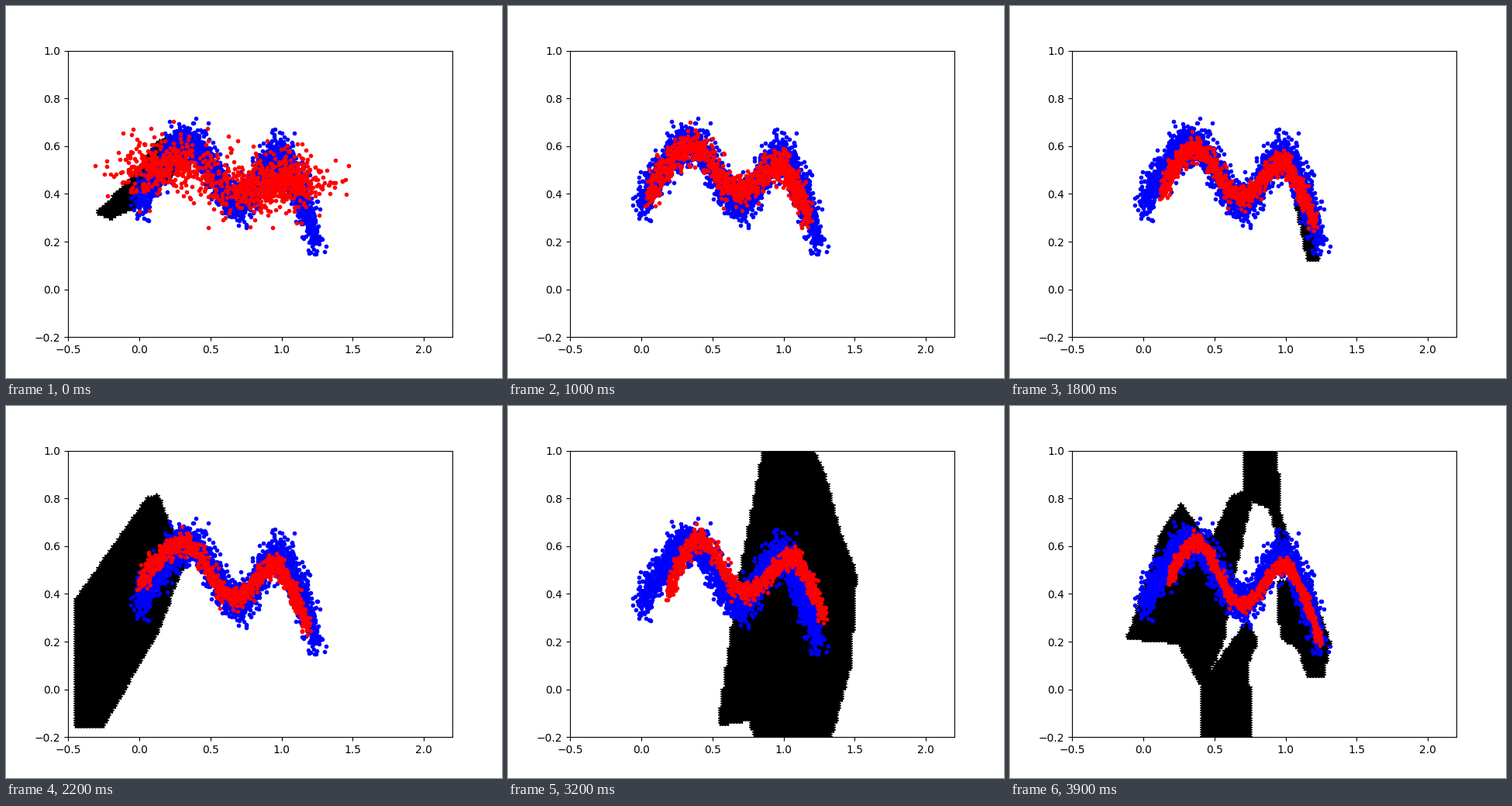
These frames come from a looping animation (640x480 px, 4 s). A matplotlib script:

```python
import numpy as np
import matplotlib.pyplot as plt
from matplotlib.animation import FuncAnimation
from matplotlib.path import Path

FRAMES, INTERVAL = 40, 100
EMPTY = -.2     # field value where the discriminator marks nothing
rng = np.random.default_rng(7)

# Both clouds are noise around an M: foot, peak, valley, peak, foot
REAL_M = [(-.01, .35), (.34, .615), (.7, .365), (.98, .56), (1.24, .2)]

# frame: (noise in x, noise in y, M of the generated samples)
FAKE = {
    0: (.1, .048, [(-.03, .49), (.25, .53), (.8, .42), (1, .45), (1.18, .45)]),
    6: (.02, .034, [(0, .37), (.36, .61), (.68, .46), (1.02, .53), (1.22, .33)]),
    14: (.011, .022, [(.09, .42), (.34, .59), (.68, .38), (.95, .5), (1.12, .27)]),
    18: (.012, .02, [(.13, .41), (.35, .59), (.69, .39), (.98, .53), (1.2, .27)]),
    25: (.012, .018, [(-.1, .475), (.27, .63), (.65, .38), (.94, .51), (1.17, .24)]),
    32: (.012, .018, [(.19, .4), (.39, .63), (.73, .41), (1.07, .55), (1.28, .3)]),
    39: (.007, .013, [(.18, .46), (.36, .62), (.69, .36), (1, .52), (1.24, .2)]),
}

# frame: outlines of the region the discriminator marks
REGIONS = {
    0: [[(-.28, .325), (-.2, .305), (0, .36), (.25, .5), (.25, .645), (.12, .61),
         (-.04, .47)]],
    6: [[(.93, 0), (.98, 0), (1.08, .13), (1.2, .19), (1.27, .45), (1, .65),
         (1.02, .2)]],
    14: [],
    18: [[(1.16, .13), (1.22, .13), (1.15, .4), (1.06, .4)]],
    25: [[(-.6, .43), (0, .94), (.2, .96), (.45, .58), (.47, .46), (.39, .4),
          (.25, .17), (-.2, -.3), (-.6, -.3)]],
    32: [[(.55, -.14), (.76, -.12), (.84, -.25), (1.3, -.25), (1.46, .1),
          (1.5, .48), (1.38, .67), (1.28, .9), (1.16, 1.05), (.88, 1.05),
          (.69, .45)]],
    39: [[(-.1, .22), (.25, .2), (.41, .02), (.55, .2), (.6, .4), (.75, .8),
          (.94, .75), (.93, 1.05), (.72, 1.05), (.72, .83), (.62, .8),
          (.5, .64), (.42, .64), (.26, .77), (.13, .65)],
         [(.42, -.3), (.42, .02), (.73, .28), (.79, .2), (.73, .12), (.75, -.3)],
         [(.95, .45), (.97, .22), (1.09, .18), (1.16, .06), (1.26, .06),
          (1.3, .2), (1.15, .45)],
         [(.9, .75), (.95, .74), (1.02, .6), (.96, .6)]],
}


def m_curve(points, u):
    """Curve through five points: bent outer legs, cosine dip between the peaks."""
    p = np.array(points, float)
    leg = np.minimum((u * 4).astype(int), 3)
    t = u * 4 - leg
    ease = np.choose(leg, [1 - (1 - t) ** 1.5, (1 - np.cos(np.pi * t)) / 2,
                           (1 - np.cos(np.pi * t)) / 2, t ** 1.5])
    return p[leg] + (p[leg + 1] - p[leg]) * np.column_stack([t, ease])


def noise(n):
    return np.clip(rng.standard_t(8, size=(n, 2)), -3.6, 3.6)


def inner_distance(points, poly):
    """Distance to the polygon's outline, positive inside."""
    p = np.array(poly)
    best = np.full(len(points), np.inf)
    for a, b in zip(p, np.roll(p, -1, axis=0)):
        ab = b - a
        t = np.clip((points - a) @ ab / (ab @ ab), 0, 1)
        gap = points - a - t[:, None] * ab
        best = np.minimum(best, np.hypot(*gap.T))
    return np.where(Path(p).contains_points(points), best, -best)


def blend(keys, frame):
    """Linear mix of the values at the two neighbouring key times."""
    times = sorted(keys)
    hi = next(t for t in times if t >= frame)
    lo = max([t for t in times if t < frame], default=hi)
    w = (frame - lo) / (hi - lo) if hi > lo else 1
    return (1 - w) * keys[lo] + w * keys[hi]


gx, gy = np.meshgrid(np.arange(-.5, 2.205, .02), np.arange(-.2, 1.005, .01))
grid = np.column_stack([gx.ravel(), gy.ravel()])
fields = {t: np.max([np.full(len(grid), EMPTY)]
                    + [inner_distance(grid, p) for p in polys], axis=0)
          for t, polys in REGIONS.items()}

real = m_curve(REAL_M, rng.random(2600)) + noise(2600) * (.024, .034)
place, jitter = rng.random(1100), noise(1100)
fake = {t: m_curve(points, place) + jitter * (sx, sy)
        for t, (sx, sy, points) in FAKE.items()}

fig, ax = plt.subplots(figsize=(6.4, 4.8), dpi=100)
ax.set_xlim(-.5, 2.2)
ax.set_ylim(-.2, 1)
region, = ax.plot([], [], "k*")
ax.plot(*real.T, "b.")
samples, = ax.plot([], [], "r.")


def update(frame):
    region.set_data(*grid[blend(fields, frame) >= -.005].T)
    samples.set_data(*blend(fake, frame).T)
    return region, samples


anim = FuncAnimation(fig, update, frames=FRAMES, interval=INTERVAL,
                     repeat=True, repeat_delay=0)
plt.show()
```
